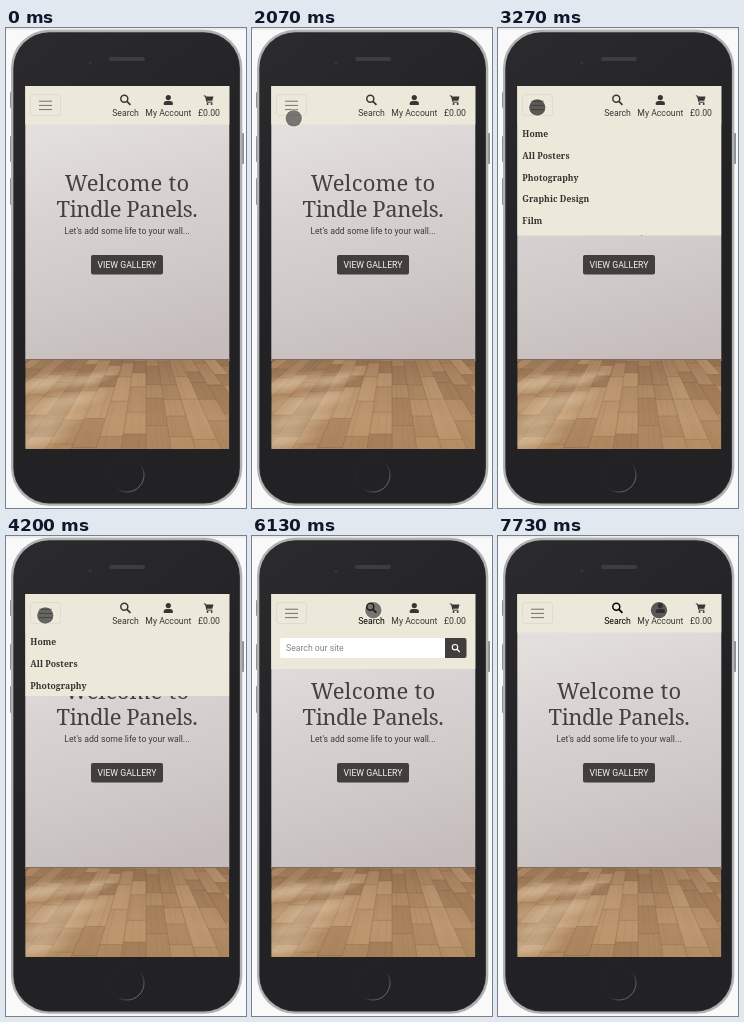
Recreate the animation shown at these times as an HTML page with a canvas. Size 240 px wide and 480 px high, loop 8000 ms.

```html
<!DOCTYPE html>
<html lang="en">
<head>
<meta charset="utf-8">
<title>Poster shop on a phone</title>
<style>
  html, body { margin: 0; width: 100%; height: 100%; overflow: hidden; background: #f8f8f8; }
  canvas { display: block; }
</style>
</head>
<body>
<canvas id="stage" width="240" height="480"></canvas>
<script>
const LOOP = 8000;
const CREAM = '#ede9da', INK = '#393735', DARK = '#413e3c';
const SANS = '8.7px Roboto, sans-serif';
const LEFT = 19.3, WIDTH = 204, FLOOR_TOP = 331, FLOOR_END = 421;
const stage = document.getElementById('stage');
const backdrop = document.createElement('canvas');
backdrop.width = 240;
backdrop.height = 480;
let ctx = backdrop.getContext('2d');

const clamp = v => Math.max(0, Math.min(1, v));
const progress = (t, start, end) => clamp((t - start) / (end - start));
const easeOut = p => 1 - (1 - p) ** 2;
const easeInOut = p => p * p * (3 - 2 * p);
const mix = (a, b, p) => a + (b - a) * p;

function rect(x, y, w, h, fill, radius = 0) {
  ctx.beginPath();
  ctx.roundRect(x, y, w, h, radius);
  ctx.fillStyle = fill;
  ctx.fill();
}

function disc(x, y, r, fill) {
  ctx.beginPath();
  ctx.arc(x, y, r, 0, Math.PI * 2);
  ctx.fillStyle = fill;
  ctx.fill();
}

function ring(x, y, r, color, width) {
  ctx.beginPath();
  ctx.arc(x, y, r, 0, Math.PI * 2);
  ctx.strokeStyle = color;
  ctx.lineWidth = width;
  ctx.stroke();
}

function line(points, color, width) {
  ctx.beginPath();
  points.forEach(([x, y]) => ctx.lineTo(x, y));
  ctx.strokeStyle = color;
  ctx.lineWidth = width;
  ctx.stroke();
}

function clipTo(x, y, w, h) {
  ctx.save();
  ctx.beginPath();
  ctx.rect(x, y, w, h);
  ctx.clip();
}

function text(str, x, y, font, fill, align = 'center', spacing = 0) {
  ctx.font = font;
  ctx.fillStyle = fill;
  ctx.textAlign = align;
  ctx.letterSpacing = spacing + 'px';
  ctx.fillText(str, x, y);
}

function gradient(x0, y0, x1, y1, ...colors) {
  const g = ctx.createLinearGradient(x0, y0, x1, y1);
  colors.forEach((c, i) => g.addColorStop(i / (colors.length - 1), c));
  return g;
}

function seeded(seed) {
  return () => (seed = (seed * 16807) % 2147483647) / 2147483647;
}

function drawPhone() {
  rect(0, 0, 240, 480, '#f9f9f9');
  rect(0, 0, 240, 2, '#ececec');
  for (const [y, h] of [[64, 16], [108, 26], [150, 27]]) rect(4, y, 3, h, '#8d9092', 1);
  rect(234, 105, 4, 31, '#8d9092', 1);
  rect(5, 1.8, 231.3, 476, '#b0b1b3', 38);
  rect(7.3, 4.2, 226.6, 471.2, '#2b2b2d', 36);
  rect(8.3, 5.2, 224.6, 469.2, gradient(8, 5, 160, 200, '#2b2b2d', '#222224'), 35);
  rect(103, 29, 36, 4, '#3d3d3f', 2);
  disc(84, 35, 1.5, '#38383b');
  ring(121, 447, 17, gradient(112, 440, 132, 458, '#252526', '#252526', '#6a6a6c'), 1);
}

function drawPlanks() {
  const random = seeded(57);
  const vanishX = 140, vanishY = 255;
  const point = (u, y) => [mix(vanishX, u, (y - vanishY) / (FLOOR_END - vanishY)), y];
  for (let u = -160; u < 360; u += 25) {
    let y = FLOOR_TOP - random() * 15;
    while (y < FLOOR_END) {
      const end = y + (7 + random() * 14) * (y - 265) / 55;
      const shade = random();
      ctx.beginPath();
      [point(u, y), point(u + 25, y), point(u + 25, end), point(u, end)].forEach(p => ctx.lineTo(...p));
      ctx.closePath();
      ctx.fillStyle = shade > .5 ? `rgba(218,185,143,${(shade - .5) * .6})` : `rgba(112,78,50,${(.5 - shade) * .5})`;
      ctx.fill();
      ctx.strokeStyle = 'rgba(105,72,45,.22)';
      ctx.lineWidth = .5;
      ctx.stroke();
      for (let i = 0; i < 3; i++) {
        const grain = u + random() * 25;
        line([point(grain, y), point(grain, end)], 'rgba(115,80,50,.12)', .6);
      }
      y = end;
    }
  }
}

function drawFloor() {
  clipTo(LEFT, FLOOR_TOP, WIDTH, FLOOR_END - FLOOR_TOP);
  rect(LEFT, FLOOR_TOP, WIDTH, 90, gradient(0, FLOOR_TOP, 0, FLOOR_END, '#9b7859', '#b08a65', '#b8926a', '#b48d64'));
  drawPlanks();
  // sunlight falling through the window panes
  for (const [cx, cy, w, h] of [[38, 355, 42, 10], [80, 352, 32, 8], [58, 374, 48, 12], [38, 394, 45, 15], [30, 412, 40, 12]]) {
    ctx.save();
    ctx.translate(cx, cy);
    ctx.rotate(-.2);
    ctx.scale(w, h);
    const glow = ctx.createRadialGradient(0, 0, .2, 0, 0, 1);
    glow.addColorStop(0, 'rgba(240,221,192,.42)');
    glow.addColorStop(1, 'rgba(240,221,192,0)');
    disc(0, 0, 1, glow);
    ctx.restore();
  }
  rect(LEFT, FLOOR_TOP, WIDTH, 1, '#86695a');
  ctx.restore();
}

function drawPage() {
  rect(LEFT, 58, WIDTH, 275, gradient(75, 96, 140, 333, '#e3dfdd', '#d8d3d2', '#cfc9c8', '#c4bdbc'));
  drawFloor();
  const serif = '22px "Noto Serif", serif';
  text('Welcome to', 121, 163.3, serif, '#45413f', 'center', .2);
  text('Tindle Panels.', 121, 189.3, serif, '#45413f', 'center', -.4);
  text("Let's add some life to your wall...", 121, 206.3, SANS, '#403d3b');
  rect(85, 227, 72, 19.5, DARK, 2);
  text('VIEW GALLERY', 121, 240.4, SANS, '#f5f4f2');
}

function magnifier(x, y, r, color) {
  ring(x, y, r, color, r * .42);
  line([[x + r * .75, y + r * .75], [x + r * 1.75, y + r * 1.75]], color, r * .5);
}

function drawHeader(searchActive) {
  rect(LEFT, 58, WIDTH, 38.5, CREAM);
  ctx.beginPath();
  ctx.roundRect(24.5, 66.5, 30, 21, 2.5);
  ctx.strokeStyle = '#dfdbcd';
  ctx.lineWidth = 1;
  ctx.stroke();
  for (const y of [73.2, 77.4, 81.6]) line([[33, y], [46, y]], '#73716b', 1);

  const searchInk = searchActive ? '#000' : INK;
  magnifier(118.3, 70.8, 3.5, searchInk);
  text('Search', 119.5, 88.4, SANS, searchInk);

  disc(162.3, 69.6, 2.6, INK);
  rect(157.6, 73, 9.4, 4, INK, [3.5, 3.5, 1, 1]);
  text('My Account', 162.3, 88.4, SANS, INK);

  line([[197.8, 67.9], [199.4, 67.9], [201, 74.2], [206.4, 74.2]], INK, 1);
  ctx.beginPath();
  ctx.moveTo(199.6, 68.5);
  ctx.lineTo(207.5, 68.5);
  ctx.lineTo(206.3, 72.8);
  ctx.lineTo(200.5, 72.8);
  ctx.fillStyle = INK;
  ctx.fill();
  disc(201.5, 76, 1, INK);
  disc(205.7, 76, 1, INK);
  text('£0.00', 203, 88.4, SANS, INK);
}

function drawMenu(open) {
  if (!open) return;
  clipTo(LEFT, 96, WIDTH, 111.5 * open);
  rect(LEFT, 96, WIDTH, 112, CREAM);
  ['Home', 'All Posters', 'Photography', 'Graphic Design', 'Film'].forEach((label, i) =>
    text(label, 24.3, 109 + i * 21.8, 'bold 8.6px "Noto Serif", serif', '#343230', 'left', .05));
  ctx.restore();
}

function drawSearchBar() {
  rect(LEFT, 96, WIDTH, 37, CREAM);
  rect(28, 102, 165, 20, '#fff', [2, 0, 0, 2]);
  text('Search our site', 34, 115.2, SANS, '#85857f', 'left');
  rect(193, 102, 21.5, 20, DARK, [0, 2, 2, 0]);
  magnifier(203, 111.2, 2.7, '#fff');
}

// start, end, target x, target y
const MOVES = [
  [733, 2270, 39.3, 86],
  [2440, 2730, 39.3, 79.5],
  [4345, 5000, 121.3, 74.3],
  [6900, 7730, 161, 74.2]
];

function drawCursor(t) {
  let x = 185, y = 345;
  for (const [start, end, toX, toY] of MOVES) {
    const p = easeOut(progress(t, start, end));
    x = mix(x, toX, p);
    y = mix(y, toY, p);
  }
  const visible = progress(t, 733, 880);
  const pressed = progress(t, 2440, 2700) * (1 - progress(t, 4070, 4350));
  const alpha = visible * (.62 + .14 * Math.max(pressed, progress(t, 7500, 7730)));
  disc(x, y, 8.2, `rgba(45,45,45,${alpha})`);
  ring(x, y, 8.8, `rgba(255,255,255,${visible * .35})`, 1);
}

drawPhone();
drawPage();
ctx = stage.getContext('2d');

function render(now) {
  const t = now % LOOP;
  ctx.drawImage(backdrop, 0, 0);
  drawMenu(easeInOut(progress(t, 2840, 3230)) - easeInOut(progress(t, 4030, 4410)));
  drawHeader(t >= 5270);
  if (t >= 5270 && t < 6530) drawSearchBar();
  drawCursor(t);
  requestAnimationFrame(render);
}
requestAnimationFrame(render);
</script>
</body>
</html>
```
